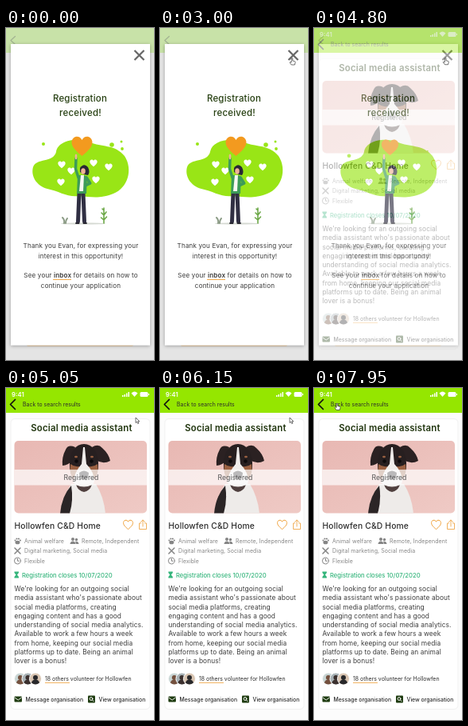
An HTML page that plays this animation: 186x415 px, repeating every 8 s.

```html
<!DOCTYPE html>
<html lang="en">
<head>
<meta charset="utf-8">
<title>Volunteer registration</title>
<style>
html, body { margin: 0; width: 100%; height: 100%; overflow: hidden; background: #fff; }
svg { display: block; width: 186px; height: 415px; }
text { font-family: Inter, sans-serif; fill: #2c2c2c; white-space: pre; }
.mid { text-anchor: middle; }
.head { font-size: 11.5px; font-weight: 500; letter-spacing: .2px; fill: #274012; }
.copy { font-size: 8.15px; letter-spacing: .13px; fill: #3c3c3c; }
.tag { font-size: 7px; letter-spacing: .08px; fill: #858585; }
.small { font-size: 6.9px; }
.line { fill: none; stroke-linecap: round; stroke-linejoin: round; }
</style>
</head>
<body>
<svg viewBox="0 0 186 415">
  <defs>
    <path id="heart" d="M0 12C-7 6-13 1-13-5C-13-13-3-15 0-8C3-15 13-13 13-5C13 1 7 6 0 12Z"/>
    <clipPath id="frame"><rect x="10.500" y="66" width="166.500" height="90.500" rx="5"/></clipPath>
    <linearGradient id="wall" x2="1" y2="1">
      <stop stop-color="#e8b8b3"/><stop offset="1" stop-color="#efcac5"/>
    </linearGradient>
    <filter id="shade" x="-10%" y="-10%" width="120%" height="120%">
      <feDropShadow dx="0" dy="1" stdDeviation="2" flood-opacity=".32"/>
    </filter>
  </defs>

  <g id="details">
    <rect width="186" height="415" fill="#fcfcfc"/>
    <rect width="186" height="31" fill="#95e600"/>
    <text x="7" y="10.500" font-size="7.800" font-weight="600" style="fill:#fff">9:41</text>
    <g fill="#fff">
      <path d="M146 9h1.500v2H146zM148.500 8H150v3h-1.500zM151 6.500h1.500V11H151zM153.500 5H155v6h-1.500z"/>
      <path d="M157.500 6.500Q161.500 2.500 165.500 6.500L161.500 11Z"/>
      <rect x="168.500" y="5" width="10" height="6" rx="1.500"/><rect x="179" y="7" width="1" height="2"/>
    </g>
    <path class="line" d="M11.500 14.500L5.500 20.500L11.500 26.500" stroke="#111" stroke-width="1.700"/>
    <text x="21" y="23" class="small" letter-spacing=".03">Back to search results</text>

    <rect x="6" y="38.500" width="175" height="363" rx="5" fill="#fff" stroke="#f1f1f1"/>
    <text x="95" y="54" class="mid" font-size="11.400" font-weight="600" letter-spacing=".22" style="fill:#20350e">Social media assistant</text>

    <g clip-path="url(#frame)">
      <rect x="10" y="66" width="167" height="91" fill="url(#wall)"/>
      <path d="M70 157Q72 134 82 120H113Q123 136 125 157Z" fill="#eeebe9"/>
      <path d="M68 157Q70 135 82 122Q85 140 80 157Z" fill="#2b2526"/>
      <path d="M87 74Q78 70 75 77Q70 86 71 97Q78 97 84 90ZM108 74Q116 69 121 75Q129 82 131 91Q122 96 113 90Z" fill="#2b2122"/>
      <path d="M80 93Q82 71 98 70Q114 71 116 93Q117 108 109 114H87Q79 108 80 93Z" fill="#271f20"/>
      <path d="M81 95Q86 99 92 98L94 112L86 116Q79 108 81 95ZM115 95Q110 99 104 98L102 112L110 116Q117 108 115 95Z" fill="#9b6142"/>
      <path d="M97 74H99L101 95Q111 105 111 117Q107 128 98 129Q88 128 85 117Q86 105 95 95Z" fill="#f0edeb"/>
      <ellipse cx="88" cy="86" rx="2" ry="1.200" fill="#9b6142"/><ellipse cx="108" cy="86" rx="2" ry="1.200" fill="#9b6142"/>
      <circle cx="88.500" cy="91.500" r="2.300" fill="#0d0a0b"/><circle cx="107.500" cy="91.500" r="2.300" fill="#0d0a0b"/>
      <path d="M92 106Q98 101 104 106Q104 113 98 114Q92 113 92 106Z" fill="#191516"/>
      <path d="M88 121Q98 126 108 121Q105 129 98 130Q91 129 88 121Z" fill="#50403f"/>
      <rect x="10" y="102" width="167" height="19.500" fill="#fff" opacity=".7"/>
    </g>
    <text x="94.500" y="114.500" class="mid" font-size="8.700" style="fill:#555">Registered</text>

    <text x="10.500" y="176" font-size="10.300" font-weight="500" letter-spacing=".15">Hollowfen C&amp;D Home</text>
    <use href="#heart" transform="translate(153.500 171) scale(.46 .47)" fill="none" stroke="#efa13a" stroke-width="2.100"/>
    <path class="line" d="M169.500 169H167.500V176.500H176.500V169H174.500M172 173V165M169.500 167.500L172 165L174.500 167.500" stroke="#efa94c" stroke-width=".9"/>

    <g fill="#858585">
      <ellipse cx="14.500" cy="193" rx="3" ry="2.300"/>
      <circle cx="11.500" cy="190.500" r="1"/><circle cx="13.500" cy="188.500" r="1.100"/>
      <circle cx="16" cy="188.500" r="1.100"/><circle cx="18" cy="190.500" r="1"/>
      <circle cx="84" cy="189" r="2"/><circle cx="88.500" cy="189.500" r="1.700"/>
      <path d="M80.500 195Q81 191.500 84 191.500T87.500 195ZM88 195L87 191.800Q91 191 91.500 195Z"/>
    </g>
    <g class="line" stroke="#858585">
      <path d="M11 200L18 207M18 200L11 207" stroke-width="1.500"/>
      <circle cx="14.500" cy="216" r="4"/><path d="M14.500 213.500V216.200H16.500"/>
    </g>
    <text x="23" y="194" class="tag">Animal welfare</text>
    <text x="95" y="194" class="tag">Remote, Independent</text>
    <text x="23" y="206" class="tag">Digital marketing, Social media</text>
    <text x="23" y="219" class="tag">Flexible</text>

    <path d="M10.500 229.500H16V231L14 233.500L16 236V237.500H10.500V236L12.500 233.500L10.500 231Z" fill="#35b57c"/>
    <text x="20" y="237" font-size="7.650" font-weight="500" style="fill:#35b57c">Registration closes 10/07/2020</text>
    <g id="about"></g>

    <g id="faces"></g>
    <text x="49" y="366" font-size="6.950">18 others volunteer for Hollowfen</text>
    <path d="M49 368.500H80" stroke="#efa13a" stroke-width=".8"/>

    <rect x="10.500" y="385.500" width="9.500" height="7" rx="1" fill="#203d12"/>
    <path class="line" d="M11 387L15.250 390L19.500 387" stroke="#fff" stroke-width=".9"/>
    <text x="24.500" y="391.700" class="small" font-weight="500">Message organisation</text>
    <rect x="103" y="384.500" width="9" height="9" rx="1" fill="#203d12"/>
    <circle class="line" cx="107" cy="388.500" r="1.900" stroke="#fff"/>
    <path d="M108.500 390L110.300 391.800" stroke="#fff"/>
    <text x="116.500" y="391.700" class="small" font-weight="500">View organisation</text>
  </g>

  <g id="modal">
    <rect width="186" height="415" fill="#e4e4e4"/>
    <rect width="186" height="31" fill="#c8e2a8"/>
    <path class="line" d="M11.500 10.500L6 15.500L11.500 20.500" stroke="#a3b392" stroke-width="1.300"/>
    <rect x="26" y="388" width="134" height="10" rx="2" fill="#e9d2b3"/>
    <rect x="6" y="20" width="175" height="376.500" fill="#fff" filter="url(#shade)"/>
    <path d="M161.500 28L173.500 40M173.500 28L161.500 40" stroke="#666" stroke-width="2.200"/>
    <text x="93" y="92" class="head mid">Registration</text>
    <text x="93.500" y="110" class="head mid">received!</text>

    <g fill="#99e516">
      <path d="M63 155C65 141 88 136 106 143C119 149 137 145 149 160C160 177 153 200 135 207C117 214 107 211 92 210C77 212 67 204 52 201C38 197 31 185 34 174C38 162 59 169 63 155Z"/>
      <g id="bubbles"></g>
    </g>
    <g id="whites" fill="#fff"></g>
    <ellipse cx="97" cy="244.500" rx="28" ry="1" fill="#d5d9d2"/>
    <g class="line">
      <path d="M73 244Q74 240 71 237M75 244Q75 240 77 238" stroke="#8c9c86" stroke-width="2"/>
      <path d="M123 244V225M123 240L119.500 237M123 240L126.500 236M123 234L120 231M123 234L126 230M123 228L121 226" stroke="#6da848" stroke-width="1.600"/>
      <path d="M92 206L90.500 242M97 206L98.500 242" stroke="#302f43" stroke-width="5"/>
      <path d="M91 187L87.500 176L88 163" stroke="#3d9b58" stroke-width="3.500"/>
      <path d="M88 163V159" stroke="#efb397" stroke-width="2.500"/>
      <path d="M101 187L105.500 194L99 197" stroke="#3d9b58" stroke-width="4"/>
      <path d="M88 244H91.500M97.500 244H101" stroke="#292832" stroke-width="1.800"/>
    </g>
    <path d="M90 185Q96 182 102 186L101 207H89Z" fill="#3d9b58"/>
    <path d="M94 184H98L97 204H92Z" fill="#f8f8f2"/>
    <path d="M93 175Q98 168 103 174Q106 180 103 184L98 183L93 180Z" fill="#292735"/>
    <ellipse cx="97" cy="179" rx="2.800" ry="3.700" fill="#efb397"/>
    <use id="bigHeart" href="#heart" fill="#f39a1f"/>

    <text x="94" y="275" class="copy mid">Thank you Evan, for expressing your</text>
    <text x="94" y="288" class="copy mid">interest in this opportunity!</text>
    <text x="94" y="312" class="copy mid">See your <tspan font-weight="600">inbox</tspan> for details on how to</text>
    <path d="M59 314.500H82" stroke="#efa13a" stroke-width=".9"/>
    <text x="94" y="325" class="copy mid">continue your application</text>
  </g>

  <g id="cursor" stroke="#333" stroke-width=".7" stroke-linejoin="round" fill="#fff">
    <path id="arrow" d="M0 0V6.500L1.600 5.100L2.700 7.600L3.900 7L2.800 4.700H4.800Z"/>
    <path id="hand" d="M-.8 0Q0-.9.800 0V3L3.500 3.700Q4.300 4 4 5.200L3.300 8H-.8L-3 5Q-2.500 3.700-.8 5Z"/>
  </g>
</svg>
<script>
const el = id => document.getElementById(id);
const clamp = x => Math.max(0, Math.min(1, x));
const ease = x => (x = clamp(x), x * x * (3 - 2 * x));
const mix = (a, b, k) => a + (b - a) * k;

el('about').innerHTML = [
  "We're looking for an outgoing social", "media assistant who's passionate about",
  'social media platforms, creating', 'engaging content and has a good',
  'understanding of social media analytics.', 'Available to work a few hours a week',
  'from home, keeping our social media', 'platforms up to date. Being an animal', 'lover is a bonus!'
].map((s, i) => `<text x="10.500" y="${254 + i * 11.25}" font-size="8.350" letter-spacing=".08" style="fill:#3c3c3c">${s}</text>`).join('');

el('whites').innerHTML = [[69, 193], [82, 179], [70, 171], [110, 169], [129, 174], [113, 190]]
  .map(([x, y]) => `<use href="#heart" transform="translate(${x} ${y}) scale(.36)"/>`).join('');

el('faces').innerHTML = [['#c9d6d5', '#74513f'], ['#a9b3b7', '#3b302e'], ['#d9c5b2', '#28282b']]
  .map(([back, person], i) => `<g transform="translate(${18 + i * 9.5} 363.500)">
    <circle r="7.500" fill="${back}" stroke="#fff"/><circle cy="-1.500" r="3" fill="${person}"/>
    <path d="M-5 5Q-4 1 0 1T5 5Q0 9-5 5Z" fill="${person}"/></g>`).join('');

// Each bubble: open x, y, radius, then closed x, y, radius
const bubbles = [
  [47, 145, 2, 43, 165, 2.5], [133, 146, 2.8, 131, 158, 1.5],
  [145, 142, 1.5, 142, 158, .7], [146, 151, 1.9, 143, 163, 1]
];
el('bubbles').innerHTML = '<circle/>'.repeat(bubbles.length);

const path = [
  [1600, 166, 36], [2100, 165.5, 36], [3000, 166, 38], [4700, 166, 38], [5000, 163, 37],
  [6250, 163, 37], [6800, 40, 25], [7150, 40, 25], [7600, 29, 19.5], [8000, 29, 19.5]
];

function cursorAt(t) {
  const i = Math.max(1, path.findIndex(p => p[0] > t));
  const [a, b] = [path[i - 1], path[i]];
  const k = ease((t - a[0]) / (b[0] - a[0]));
  return [mix(a[1], b[1], k), mix(a[2], b[2], k)];
}

function draw(t) {
  const beat = t % 3950;
  const open = 1 - ease((beat - 100) / 350) + ease((beat - 700) / 450);
  el('bigHeart').setAttribute('transform', `translate(95.500 ${mix(150, 148, open)}) scale(${mix(.75, 1, open)})`);
  bubbles.forEach(([x, y, r, x0, y0, r0], i) => {
    const c = el('bubbles').children[i];
    c.setAttribute('cx', mix(x0, x, open));
    c.setAttribute('cy', mix(y0, y, open));
    c.setAttribute('r', mix(r0, r, open));
  });
  el('modal').setAttribute('opacity', 1 - ease((t - 4680) / 300));

  const pointing = t < 4850 || t > 6700;
  el('cursor').setAttribute('visibility', t < 1600 ? 'hidden' : 'visible');
  el('cursor').setAttribute('transform', `translate(${cursorAt(t)})`);
  el('hand').setAttribute('display', pointing ? 'inline' : 'none');
  el('arrow').setAttribute('display', pointing ? 'none' : 'inline');
}

function tick() {
  draw(performance.now() % 8000);
  requestAnimationFrame(tick);
}
tick();
</script>
</body>
</html>
```
